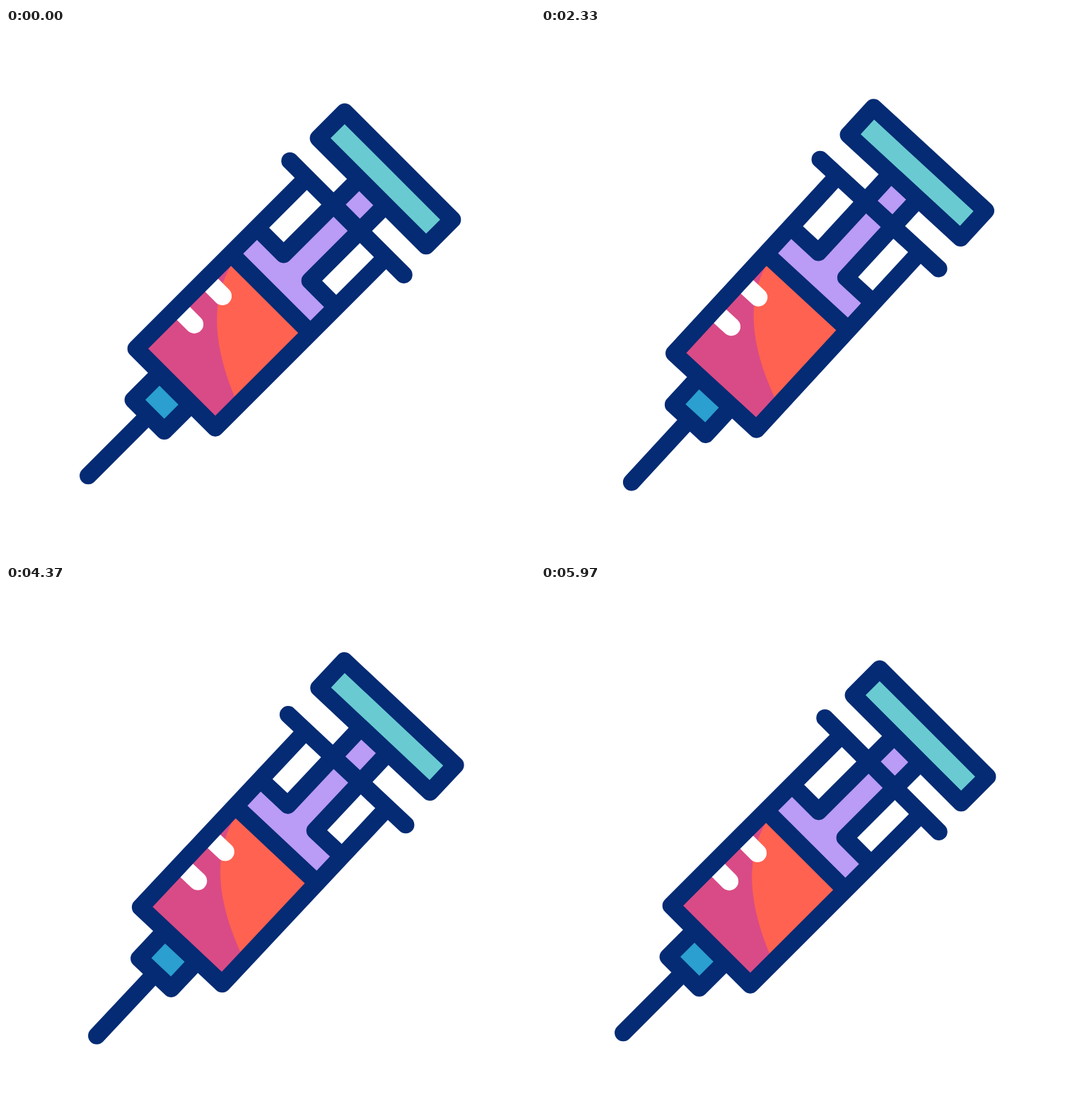
An HTML page for the animation above (6000 ms loop, 748x748 px).

```html
<!DOCTYPE html>
<html lang="en">
<head>
<meta charset="utf-8">
<title>Syringe</title>
<style>
  html, body { margin: 0; width: 100%; height: 100%; overflow: hidden; background: #fff; }
  svg { display: block; width: 100vw; height: 100vh; }
  .line { fill: none; stroke: #042b74; stroke-width: 24.4; stroke-linejoin: round; }
  .round { stroke-linecap: round; }
</style>
</head>
<body>
<svg viewBox="0 0 748 748">
  <defs>
    <clipPath id="inside"><rect id="fluidBox" x="-70" width="142"/></clipPath>
  </defs>
  <!-- local axes: x across the syringe, y from handle to needle -->
  <g id="syringe">
    <g clip-path="url(#inside)">
      <rect x="-70" y="-120" width="142" height="312" fill="#d94b86"/>
      <path id="fluid" fill="#ff6250"/>
      <path d="M-80 51.5H-44.5M-80 108H-44.5" fill="none" stroke="#fff" stroke-width="26" stroke-linecap="round"/>
    </g>
    <g id="plunger">
      <path id="rod" fill="#ba9bf5"/>
      <path id="rodLines" class="line"/>
      <path class="line" d="M-78 .6H80"/>
      <g id="handle">
        <rect class="line" x="-106.4" y="-254.7" width="215.4" height="52.5" style="fill:#69cbd1"/>
      </g>
    </g>
    <path class="line round" d="M.9 365.4V245"/>
    <path class="line" d="M-30 192V244.7H32.3V192Z" style="fill:#2a9fd0"/>
    <path class="line" d="M-78.3 -151V190.6H80.2V-151"/>
    <path class="line round" d="M-112.2 -151H115.6"/>
  </g>
</svg>
<script>
const $ = id => document.getElementById(id);
const [syringe, plunger, handle, rod, rodLines, fluid, fluidBox] =
  ['syringe', 'plunger', 'handle', 'rod', 'rodLines', 'fluid', 'fluidBox'].map($);

const smooth = u => u * u * (3 - 2 * u);
const linear = u => u;
const quadIn = u => u * u;

// Keys are [step, value, easing towards this key].
function track(keys, step) {
  const next = keys.findIndex(key => key[0] > step);
  if (next < 0) return keys[keys.length - 1][1];
  if (next === 0) return keys[0][1];
  const [t0, v0] = keys[next - 1], [t1, v1, ease = smooth] = keys[next];
  return v0 + (v1 - v0) * ease((step - t0) / (t1 - t0));
}

const tilt = [[0, 0], [4.5, -3.4], [14, 0], [30, 0], [34, -3.2], [41, 2.1], [45.5, 0]];
const slide = [[7, 0], [17.5, 39], [21.5, 39], [36.2, -67], [46.1, 0]];
const drift = [[23, 0], [30, 0.7], [43, 0.7], [48, 0]];
const pull = [[7, 0], [17.5, 44.5], [20.8, 44.5], [30, -10, quadIn], [43, -10], [47, 0]];
const sway = [[11.5, 0], [14, 8.4], [38, 0, linear]];
const bulge = [[23, 0], [31, 1], [36, 1], [47.5, 0]];

function render(ms) {
  // 25 drawings a second, shown on a 30 Hz grid
  const step = Math.floor(Math.floor((ms % 6000 + 4) * 0.03) * 5 / 6) % 50;
  const at = keys => track(keys, step);
  const offset = keys => at(keys) * Math.SQRT2;

  const up = -offset(slide), pulled = -offset(pull), side = offset(sway), g = at(bulge);
  syringe.setAttribute('transform',
    `translate(374 374) rotate(${45 + at(tilt)}) translate(${offset(drift)} ${up})`);
  plunger.setAttribute('transform', `translate(0 ${pulled})`);
  handle.setAttribute('transform', `translate(${side} 0)`);

  const left = -24.9 + side, right = 27.7 + side;
  rod.setAttribute('d', `M-72 .6V-51.2H${left}V-202H${right}V-51.2H74V.6Z`);
  rodLines.setAttribute('d', `M-78 -51.2H${left}V-202M80 -51.2H${right}V-202`);

  fluidBox.setAttribute('y', pulled);
  fluidBox.setAttribute('height', 191 - pulled);
  fluid.setAttribute('d',
    `M-66 -120V${14 + 44 * g}Q${-45 + 15 * g} ${93 + 50 * g} 68 ${140 + 4 * g}H74V-120Z`);
}

const start = performance.now();
function tick() {
  render(performance.now() - start);
  requestAnimationFrame(tick);
}
tick();
</script>
</body>
</html>
```
